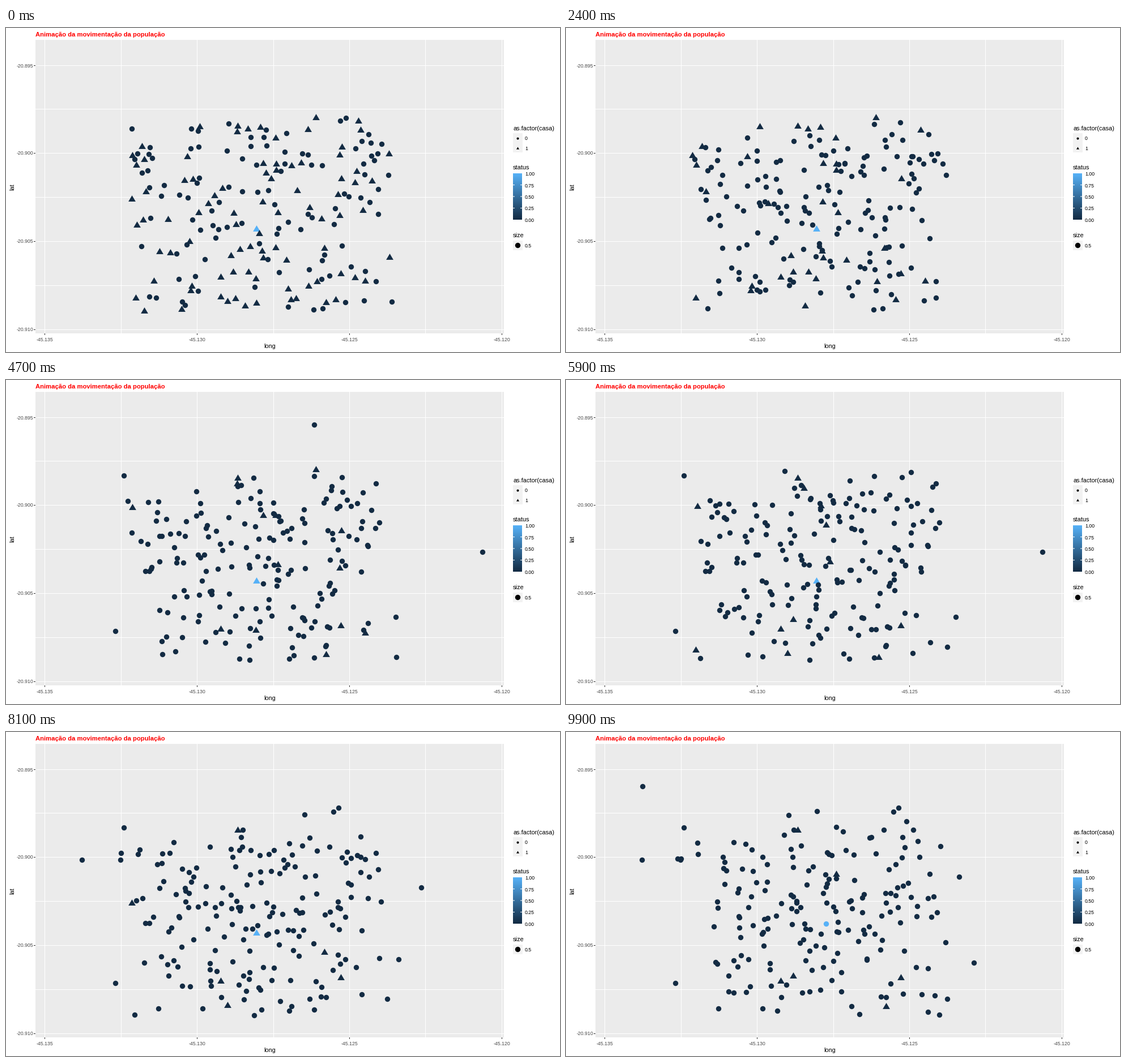
Animation, 978 px wide and 573 px high, one loop 10000 ms. Source, as a matplotlib script:

```python
import numpy as np
import matplotlib.pyplot as plt
from matplotlib.animation import FuncAnimation
from matplotlib.colors import LinearSegmentedColormap
from matplotlib.patches import Rectangle
from matplotlib.path import Path

W, H, DPI = 978, 573, 96
PX = 72 / DPI  # points per pixel
FRAMES, STEPS = 100, 19
DARK, LIGHT = "#132B43", "#56B1F7"
TRIANGLE = Path([(0, .85), (-1, -.85), (1, -.85), (0, .85)])
DOT, TRI = 9.4, 12.8

HOUSED, OUTDOOR = 88, 108
LOW, HIGH = np.array([222, 157]), np.array([681, 499])
MOVE, RETURN = .24, .06  # chances per step

# Far trips: x, y, first step, last step
TRIPS = [(841, 304, 8, 15), (193, 444, 9, 19), (208, 169, 9, 19),
         (544, 79, 9, 10), (134, 226, 13, 19), (95, 60, 13, 14),
         (572, 45, 13, 14), (135, 96, 17, 19)]

rng = np.random.default_rng(5)


def village(n, gap=8):
    """Random places that keep a small distance from each other."""
    points = [rng.uniform(LOW, HIGH)]
    while len(points) < n:
        p = rng.uniform(LOW, HIGH)
        if np.hypot(*(np.array(points) - p).T).min() > gap:
            points.append(p)
    return np.array(points)


def hop(base, k):
    """New places around the bases, spreading wider with every step."""
    centre = (LOW + HIGH) / 2
    p = centre + .87 * (base - centre) + rng.normal(0, 14 + 1.5 * k, base.shape)
    grow = 2.5 * max(k - 2, 0)
    low, high = LOW - grow, HIGH + (grow, grow / 5)
    p = high - abs(high - p)
    return low + abs(p - low)


def make_people():
    n = HOUSED + OUTDOOR
    base, housed = village(n), np.arange(n) < HOUSED
    pos, home = [base], [housed]
    for k in range(1, STEPS + 1):
        go = rng.random(n) < MOVE
        back = housed & (rng.random(n) < RETURN)
        goal = np.where(back[:, None], base, hop(base, k))
        pos.append(np.where(go[:, None], goal, pos[-1]))
        home.append(np.where(go, back, home[-1]))
    pos, home = np.array(pos), np.array(home)

    free = ~housed
    for x, y, a, b in TRIPS:
        away = np.hypot(*(pos[a - 1] - (x, y)).T)
        who = np.argmin(np.where(free, away, np.inf))
        pos[a:b + 1, who] = x, y
        free[who] = False
    return pos, home


pos, home = make_people()

# The one marked person stays at home almost to the end
lit_pos = np.full((STEPS + 1, 1, 2), (442., 354.))
lit_pos[17], lit_pos[18:] = (448, 351), (459, 339)
lit_home = np.arange(STEPS + 1)[:, None] < 18

plt.rcParams["font.family"] = "Liberation Sans"
fig = plt.figure(figsize=(W / DPI, H / DPI), dpi=DPI, facecolor="white")
ax = fig.add_axes([0, 0, 1, 1])


def box(x, y, w, h, color):
    ax.add_patch(Rectangle((x, y), w, h, fc=color, lw=0, zorder=0))


def line(x0, y0, x1, y1, color, z=1):
    ax.plot([x0, x1], [y0, y1], color=color, lw=PX, zorder=z, snap=False,
            solid_capstyle="butt")


def label(x, y, s, size=8.8, color="black", **kw):
    ax.text(x, y, s, fontsize=size * PX, color=color, **kw)


def dots(color, marker, size, z=4, xy=((), ())):
    return ax.scatter(*xy, s=(size * PX) ** 2, c=color, marker=marker,
                      linewidths=0, zorder=z)


def draw_panel():
    box(52, 21, 827, 519, "#EBEBEB")
    for j in range(7):
        x = round(68.3 + 134.4 * j) + .5
        y = round(65.6 + 77.85 * j) + .5
        line(x, 21, x, 540, "white")
        line(52, y, 879, y, "white")
        if j % 2 == 0:
            line(x, 540, x, 543, "#333333")
            line(49, y, 52, y, "#333333")
            label(x, 554, f"{-45.135 + .0025 * j:.3f}", color="#4D4D4D",
                  ha="center")
            label(48, y + 3, f"{-20.895 - .0025 * j:.3f}", color="#4D4D4D",
                  ha="right")
    label(52, 15, "Animação da movimentação da população", 11.25, "red",
          weight="bold")
    label(466, 566, "long", 10.8, ha="center")
    label(11, 281, "lat", 10.8, ha="center", va="center", rotation=90)


def draw_legend():
    label(895, 181, "as.factor(casa)", 11)
    for y, marker, size, text in ((194.5, "o", 4, "0"),
                                  (211.5, TRIANGLE, 5, "1"),
                                  (384, "o", DOT, "0.5")):
        box(894.5, y - 8.5, 17, 17, "#F2F2F2")
        dots("black", marker, size, xy=([902.7], [y]))
        label(916, y + 4, text)

    label(895, 250, "status", 11)
    ramp = LinearSegmentedColormap.from_list("status", [LIGHT, DARK])
    ax.imshow(np.linspace(0, 1, 82)[:, None], cmap=ramp, aspect="auto",
              extent=(895, 911, 339, 257), zorder=1)
    for j in range(5):
        y = 257 + 20.5 * j
        label(916, y + 4, f"{1 - j / 4:.2f}")
        if 0 < j < 4:
            line(895, y, 898, y, "white", 2)
            line(908, y, 911, y, "white", 2)
    label(895, 370, "size", 11)


draw_panel()
draw_legend()
ax.set(xlim=(0, W), ylim=(H, 0))
ax.axis("off")

crowd = dots(DARK, "o", DOT), dots(DARK, TRIANGLE, TRI)
lit = dots(LIGHT, "o", DOT, 3), dots(LIGHT, TRIANGLE, TRI, 3)


def place(artists, track, flags, t):
    k = min(int(t), STEPS - 1)
    xy = track[k] + (t - k) * (track[k + 1] - track[k])
    inside = flags[int(t + .5)]
    artists[0].set_offsets(xy[~inside])
    artists[1].set_offsets(xy[inside])


def update(i):
    t = i * STEPS / (FRAMES - 1)
    place(crowd, pos, home, t)
    place(lit, lit_pos, lit_home, t)
    return crowd + lit


anim = FuncAnimation(fig, update, frames=FRAMES, interval=100, repeat=True)
plt.show()
```
